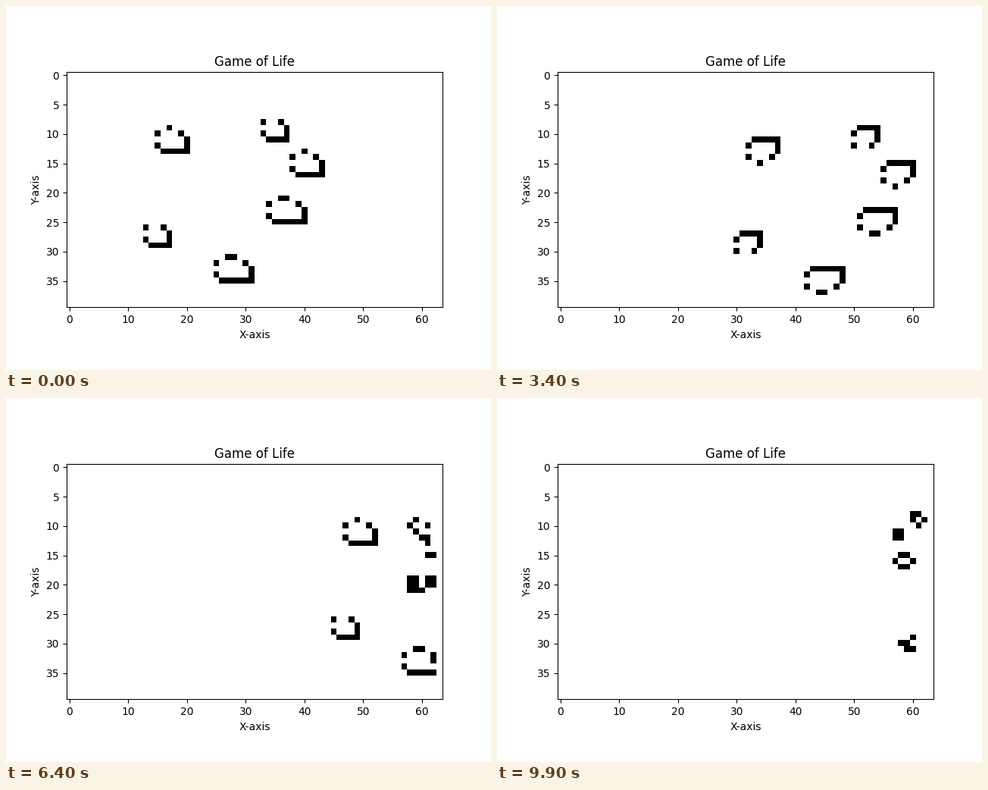
A matplotlib script for the animation above (10000 ms loop, 640 by 480 pixels).

```python
import numpy as np
import matplotlib.pyplot as plt
from matplotlib.animation import FuncAnimation

ROWS, COLS = 40, 64
STEPS, INTERVAL = 100, 100

# Spaceships heading right: (left column, top row, width)
SHIPS = [(15, 9, 6), (33, 7, 5), (38, 13, 6),
         (34, 21, 7), (13, 25, 5), (25, 31, 7)]


def add_ship(grid, x, y, w):
    """Place a light (5), middle (6) or heavy (7) weight spaceship."""
    grid[y, x + 2:x + w - 3] = 1
    grid[y + 1, [x, x + w - 2]] = 1
    grid[y + 2, x + w - 1] = 1
    grid[y + 3, [x, x + w - 1]] = 1
    grid[y + 4, x + 1:x + w] = 1


def evolve(grid):
    """Advance one generation; the outermost ring always stays dead."""
    near = sum(grid[1 + dy:ROWS - 1 + dy, 1 + dx:COLS - 1 + dx]
               for dy in (-1, 0, 1) for dx in (-1, 0, 1) if dx or dy)
    inner = grid[1:-1, 1:-1]
    new = np.zeros_like(grid)
    new[1:-1, 1:-1] = (near == 3) | ((inner == 1) & (near == 2))
    return new


start = np.zeros((ROWS, COLS), dtype=int)
for ship in SHIPS:
    add_ship(start, *ship)

history = [start]
while len(history) < STEPS:
    history.append(evolve(history[-1]))

fig, ax = plt.subplots(figsize=(6.4, 4.8), dpi=100)
image = ax.imshow(start, cmap="binary", vmin=0, vmax=1)
ax.set_title("Game of Life")
ax.set_xlabel("X-axis")
ax.set_ylabel("Y-axis")


def update(i):
    image.set_data(history[i])
    return [image]


anim = FuncAnimation(fig, update, frames=STEPS, interval=INTERVAL,
                     repeat=True, repeat_delay=0)
plt.show()
```
